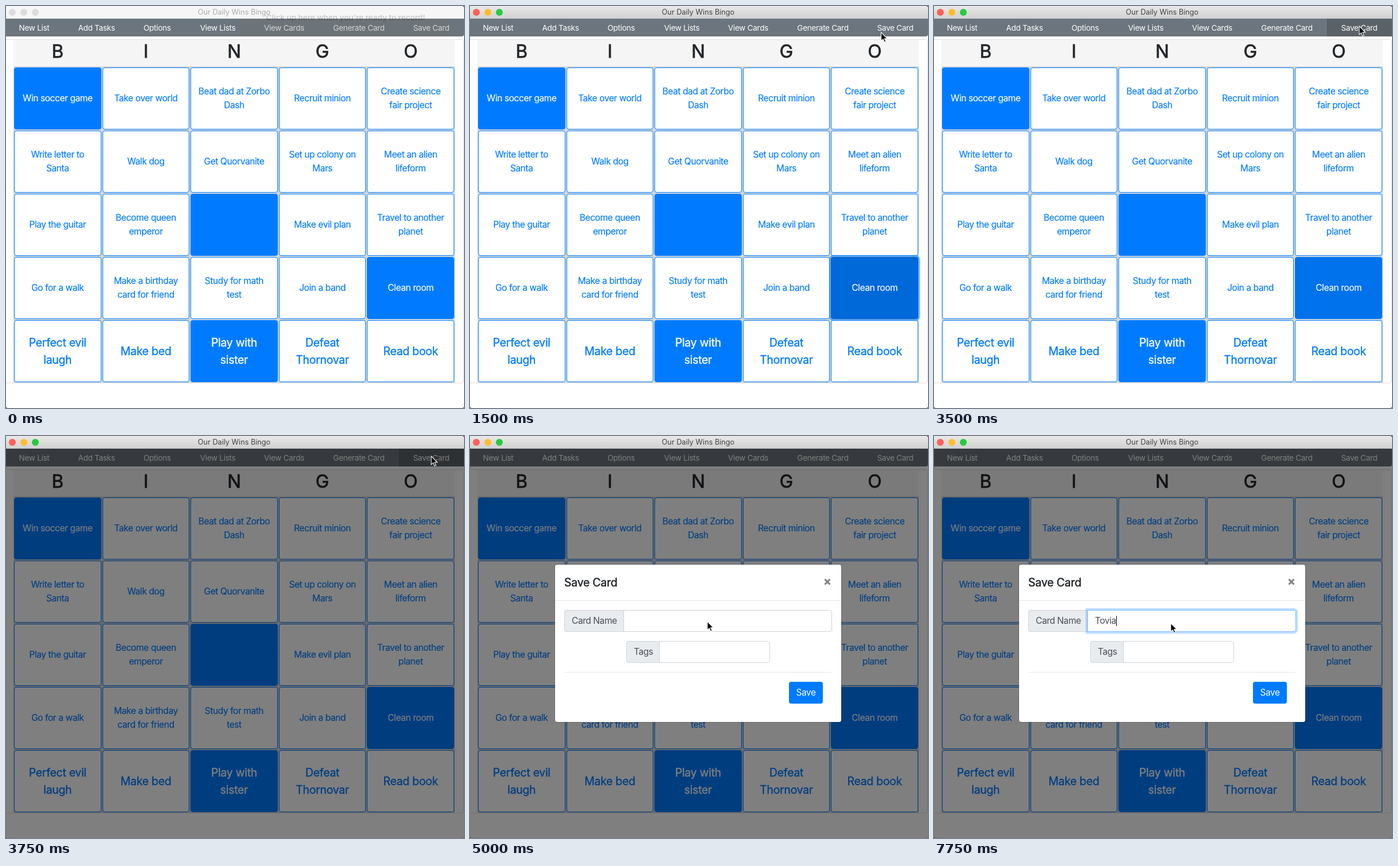
Animation, 797 px wide and 700 px high, one loop 8 s. Source, as an HTML page:

```html
<!DOCTYPE html>
<html lang="en">
<head>
<meta charset="utf-8">
<title>Bingo card</title>
<style>
* { box-sizing: border-box; }
html, body { margin: 0; width: 100%; height: 100%; overflow: hidden; background: #16242c; }
body { font: 15.5px/24px Inter, "Open Sans", sans-serif; letter-spacing: -.027em; color: #212529; }
#stage { position: absolute; left: 0; top: 0; width: 797px; height: 700px; overflow: hidden; background: #fff; border-radius: 0 4px 3px 3px; }
#stage div, #cursor { position: absolute; }
.mid { transform: translate(-50%, -50%); white-space: nowrap; text-align: center; }

#bar { width: 797px; height: 22px; background: #f6f6f6; color: #acacac; font-size: 12.7px; letter-spacing: 0; }
#bar .light { top: 5px; width: 12px; height: 12px; border-radius: 50%; background: #dcdcdc; }
#bar.active { background: linear-gradient(#e9e9e9, #d0d0d0); color: #404040; }
#bar.active .light { background: var(--hue); }

#nav { top: 22px; width: 797px; height: 31px; background: #6c757d; border-radius: 0 0 4px 0; color: #fff; font-size: 13.6px; letter-spacing: -.024em; }
#hover { left: 682px; width: 115px; height: 31px; background: #5a6268; border-left: 1px solid #7b848b; }
#bubble { left: 408px; top: 0; width: 367px; height: 52px; overflow: hidden; color: rgba(0,0,0,.18); font: 600 13.5px/20px Inter, sans-serif; letter-spacing: 0; }
#bubble i { position: absolute; top: 22px; width: 100%; height: 31px; background: rgba(110,112,114,.3); }

#card { top: 58px; left: -4px; width: 801px; height: 599px; border: 1px solid #dfdfdf; border-radius: 4px; }
#head { left: 13px; top: 59px; width: 768px; height: 47px; background: #f5f5f5; border-bottom: 1px solid #d3d7db; font-size: 31.5px; letter-spacing: 0; -webkit-text-stroke: .8px; }
#grid { left: 13px; top: 106px; width: 768px; height: 550px; background: #d3d7db; }
.cell { display: flex; align-items: center; justify-content: center; text-align: center; width: 151.6px; height: 108px; background: #fff; color: #007bff; border: 1px solid #007bff; border-radius: 4px; white-space: pre; -webkit-text-stroke: .15px; }
.cell.big { font-size: 19.4px; line-height: 30px; letter-spacing: -.014em; -webkit-text-stroke: .35px; }
.cell.on { background: #007bff; color: #fff; }
.cell.focus { background: #0069d9; border-color: #0062cc; box-shadow: 0 0 0 3.2px rgba(0,123,255,.5); }
.cell.fading { background: #0072ec; }

#shade { top: 22px; width: 797px; height: 678px; background: #000; opacity: .5; }
#modal { left: 148px; top: 224px; width: 498px; height: 274px; background: #fff; border-radius: 4px; color: #495057; box-shadow: 0 0 0 1px rgba(0,0,0,.2); }
#modal .title { left: 16px; top: 16px; font-size: 19.4px; line-height: 30px; letter-spacing: -.01em; color: #212529; white-space: nowrap; -webkit-text-stroke: .5px; }
.rule { height: 1px; background: #e5e7e9; }
.label, .field { height: 38px; border: 1px solid #ced4da; line-height: 36px; padding-left: 12px; white-space: nowrap; }
.label { background: #e9ecef; border-radius: 4px 0 0 4px; }
.field { border-radius: 0 4px 4px 0; background: #fff; }
.field.focus { border-color: #80bdff; box-shadow: 0 0 0 3.2px rgba(0,123,255,.25); }
#caret { display: inline-block; width: 1px; height: 18px; background: #000; vertical-align: -4px; }
#save { left: 407px; top: 204px; width: 59px; height: 38px; line-height: 38px; border-radius: 4px; background: #007bff; color: #fff; text-align: center; }
#cursor { left: 0; top: 0; overflow: visible; }
</style>
</head>
<body>
<div id="stage">
  <div id="bar">
    <div class="light" style="left:5px;--hue:#ff5f57"></div>
    <div class="light" style="left:25px;--hue:#ffbd2e"></div>
    <div class="light" style="left:45px;--hue:#28c940"></div>
    <div class="mid" style="left:397px;top:11px">Our Daily Wins Bingo</div>
  </div>
  <div id="nav"><div id="hover"></div></div>
  <div id="bubble"><i></i><div class="mid" style="left:183px;top:20px">Click up here when you're ready to record!</div></div>
  <div id="card"></div>
  <div id="head"></div>
  <div id="grid"></div>
  <div id="shade"></div>
  <div id="modal">
    <div class="title">Save Card</div>
    <svg style="position:absolute;left:468px;top:24px" width="12" height="12"><path d="M1.5 1.5l9 9m0-9l-9 9" stroke="#7f7f7f" stroke-width="3"/></svg>
    <div class="rule" style="top:62px;width:498px"></div>
    <div class="label" style="left:16px;top:79px;width:104px">Card Name</div>
    <div class="field" id="name" style="left:119px;top:79px;width:363px"><span id="typed"></span><span id="caret"></span></div>
    <div class="label" style="left:124px;top:133px;width:58px">Tags</div>
    <div class="field" style="left:181px;top:133px;width:193px"></div>
    <div class="rule" style="left:16px;top:187px;width:466px"></div>
    <div id="save">Save</div>
  </div>
  <svg id="cursor" width="12" height="18"><path d="M0 0V14.8L3.4 11.7 5.7 17 8.2 15.9 5.9 10.8H10.6Z" fill="#000" stroke="#fff" stroke-width="1.1"/></svg>
</div>
<script>
const $ = id => document.getElementById(id);
const LOOP = 8000, STEP = 250;
const cardName = "Tovia";
const menu = [["New List", 49], ["Add Tasks", 157.5], ["Options", 263], ["View Lists", 368.5],
  ["View Cards", 484], ["Generate Card", 614], ["Save Card", 740]];
const tasks = [
  "Win soccer game", "Take over world", "Beat dad at Zorbo\nDash", "Recruit minion", "Create science\nfair project",
  "Write letter to\nSanta", "Walk dog", "Get Quorvanite", "Set up colony on\nMars", "Meet an alien\nlifeform",
  "Play the guitar", "Become queen\nemperor", "", "Make evil plan", "Travel to another\nplanet",
  "Go for a walk", "Make a birthday\ncard for friend", "Study for math\ntest", "Join a band", "Clean room",
  "Perfect evil\nlaugh", "Make bed", "Play with\nsister", "Defeat\nThornovar", "Read book"];
const marked = [0, 12, 19, 22];

function add(parent, className, text, left, top) {
  const el = document.createElement("div");
  el.className = className;
  el.textContent = text;
  el.style.left = left + "px";
  el.style.top = top + "px";
  return parent.appendChild(el);
}

menu.forEach(([text, x]) => add($("nav"), "mid", text, x, 16));
[..."BINGO"].forEach((letter, i) => add($("head"), "mid", letter, 76.8 + i * 153.6, 20));
const cells = tasks.map((text, i) => add($("grid"),
  "cell" + (i >= 20 ? " big" : "") + (marked.includes(i) ? " on" : ""),
  text, 1 + i % 5 * 153.6, 1 + Math.floor(i / 5) * 110));
const room = cells[19];

// Pointer stops: time, x, y
const path = [[750, 690, 8], [1000, 703, 22], [1250, 712, 38], [1500, 715.5, 46], [2000, 715.5, 46],
  [2250, 724, 43], [2500, 734, 37], [2750, 740, 35], [3750, 740, 35], [4000, 650, 115],
  [4250, 490, 230], [4500, 425, 276], [4750, 415, 306], [5000, 413, 323], [5250, 412, 326]];

function pointerAt(t) {
  const next = path.findIndex(p => p[0] > t);
  if (next < 0) return path[path.length - 1].slice(1);
  const a = path[Math.max(0, next - 1)], b = path[next];
  const k = Math.max(0, (t - a[0]) / (b[0] - a[0] || 1));
  return [a[1] + (b[1] - a[1]) * k, a[2] + (b[2] - a[2]) * k];
}

const within = (t, from, to) => t >= from && t < to;
const show = (id, on) => { $(id).style.visibility = on ? "visible" : "hidden"; };

function draw(t) {
  $("bar").classList.toggle("active", t >= 1500);
  $("bubble").style.opacity = Math.max(0, 1 - t / 1000);
  show("hover", within(t, 2250, 4000));
  room.classList.toggle("focus", within(t, 1500, 3500));
  room.classList.toggle("fading", within(t, 3500, 3750));

  show("shade", t >= 3750);
  const open = Math.min(1, Math.max(0, (t - 3750) / 500));
  const slide = 1 - (1 - open) ** 2;
  $("modal").style.opacity = slide;
  $("modal").style.transform = `translateY(${-50 * (1 - slide)}px)`;

  const focused = t >= 5250;
  const typing = t >= 7000;
  $("name").classList.toggle("focus", focused);
  show("caret", focused && (typing || (t - 5250) % 1000 < 500));
  $("typed").textContent = cardName.slice(0, typing ? Math.ceil((t - 6750) / 200) : 0);

  const [x, y] = pointerAt(t);
  show("cursor", t >= 750);
  $("cursor").style.transform = `translate(${x}px, ${y}px)`;
}

function tick() {
  draw(Math.floor(performance.now() % LOOP / STEP) * STEP);
  requestAnimationFrame(tick);
}
tick();
</script>
</body>
</html>
```
